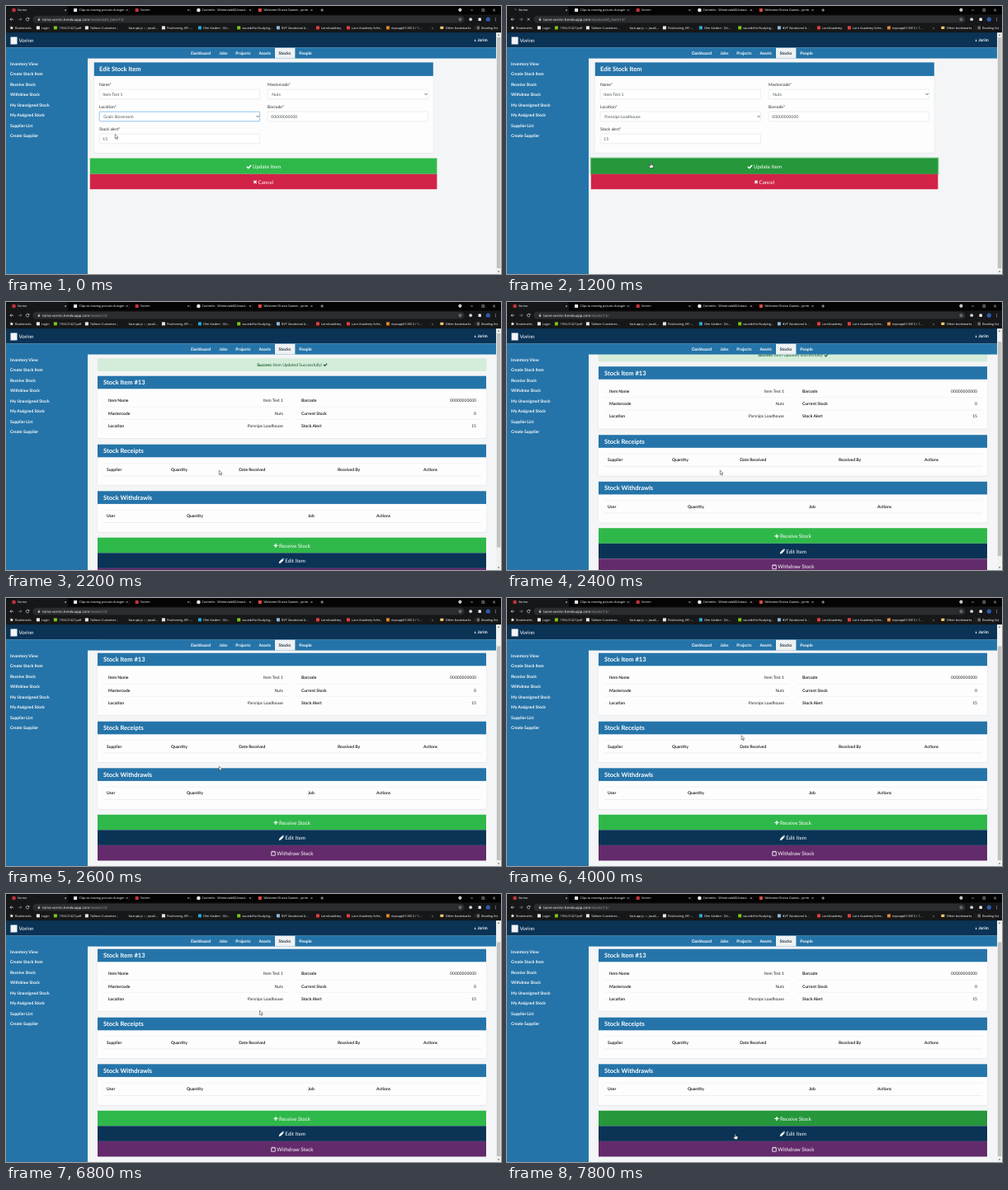
Write an HTML page that moves like this. It is 600x325 px and loops after 8000 ms.

```html
<!DOCTYPE html>
<html lang="en">
<head>
<meta charset="utf-8">
<title>Stock item</title>
<style>
  html, body { margin: 0; width: 100%; height: 100%; overflow: hidden; background: #f4f5f6; }
  svg { display: block; }
  #stage { width: 100vw; height: 100vh; }
  text { font-family: Lato, sans-serif; font-size: 5px; text-rendering: geometricPrecision; white-space: pre; }
  .ui { font-family: "Open Sans", "Noto Sans", sans-serif; font-size: 3.75px; }
</style>
</head>
<body>
<svg id="stage" viewBox="0 0 600 325" preserveAspectRatio="none"></svg>
<script>
const LOOP = 8000, STEP = 200;
const BLUE = '#2574a9', NAVY = '#0a3356', GREEN = '#2fb84a', DARK_GREEN = '#26973b';
const RED = '#d12348', PURPLE = '#642b6c', INK = '#212529', LINE = '#dee2e6';
const STRIP = '#040404', TOOLBAR = '#161718', PILL = '#2b2c2f';
const BRAND = 'Vorinn', HOST = 'tarne-vorinn.herokuapp.com';
const OLD_PLACE = 'Grain Storeroom', NEW_PLACE = 'Parsnips Loadhouse';

const rect = (x, y, w, h, fill, more = '') =>
  `<rect x="${x}" y="${y}" width="${w}" height="${h}" fill="${fill}" ${more}/>`;
const dot = (x, y, r, fill) => `<circle cx="${x}" cy="${y}" r="${r}" fill="${fill}"/>`;
const text = (x, y, str, fill = INK, more = '') =>
  `<text x="${x}" y="${y}" fill="${fill}" ${more}>${str}</text>`;
const bold = (x, y, str, fill = INK, more = '') => text(x, y, str, fill, 'font-weight="700" ' + more);
const ui = (x, y, str, fill = '#fff', more = '') => text(x, y, str, fill, 'class="ui" ' + more);
const stroke = (d, color, w = .6, more = '') =>
  `<path d="${d}" fill="none" stroke="${color}" stroke-width="${w}" ${more}/>`;
const hline = (x1, x2, y, w = .35) => stroke(`M${x1} ${y}H${x2}`, LINE, w);
const group = (id, body, more = '') => `<g id="${id}" ${more}>${body}</g>`;
const END = 'text-anchor="end"';

// Button icons, each drawn around its own centre
const ICONS = {
  check: stroke('M-2.6 .2L-.8 2L2.7 -1.7', '#fff', 1.5),
  cross: stroke('M-1.6 -1.6L1.6 1.6M1.6 -1.6L-1.6 1.6', '#fff', 1.3),
  plus: stroke('M-2.5 0H2.5M0 -2.5V2.5', '#fff', 1.2),
  pencil: '<path d="M-3 3L-2.5 .8L.8 -2.5L2.5 -.8L-.8 2.5ZM1.2 -2.9L2 -3.4L3.3 -2L2.9 -1.2Z" fill="#fff"/>',
  calendar: stroke('M-2.3 -1.8H2.3V2.6H-2.3ZM-1.1 -3V-1.4M1.1 -3V-1.4', '#fff', .8)
};
const icon = (name, x, y) => `<g transform="translate(${x} ${y})">${ICONS[name]}</g>`;

function button(id, x, y, w, h, fill, label, name, iconX, textX) {
  const mid = y + h / 2 + .4;
  return rect(x, y, w, h, fill, `id="${id}"`) + icon(name, iconX, mid) +
    text(textX, mid + 2.2, label, '#fff', 'style="font-size:6.25px"');
}

function card(x, y, w, h, head, title, titleX) {
  return rect(x - .4, y + .5, w + .8, h + .3, '#e3e5e7', 'rx="1.2"') +
    rect(x, y, w, h, '#fdfdfd', 'rx="1"') + rect(x, y, w, head, BLUE) +
    bold(titleX, y + head / 2 + 2.6, title, '#fff', 'style="font-size:7.5px"');
}

function field(x, y, label, value, select, id) {
  return text(x, y - 4.2, label, '#2b2f33') +
    rect(x + .2, y + .2, 194.4, 11.6, '#fff', `rx="1" stroke="#ced4da" stroke-width=".4" id="${id}Box"`) +
    text(x + (select ? 5.3 : 4.3), y + 7.9, value, '#495057', `id="${id}Text"`) +
    (select ? stroke(`M${x + 190.7} ${y + 5.2}l1.4 1.4l1.4 -1.4`, '#222', .8) : '');
}

function formPage() {
  return card(106.8, 68.4, 411, 109.6, 16.5, 'Edit Stock Item', 113) +
    field(113, 101, 'Name*', 'Item Test 1', false, 'name') +
    field(317, 101, 'Mastercode*', 'Nuts', true, 'code') +
    field(113, 128, 'Location*', OLD_PLACE, true, 'place') +
    field(317, 128, 'Barcode*', '00000000000', false, 'bar') +
    field(113, 155, 'Stock alert*', '15', false, 'alert') +
    rect(100.8, 183.6, 422.6, 21.2, '#8fd79d', 'rx="1" id="ring"') +
    button('update', 101.8, 184.6, 420.6, 19.2, GREEN, 'Update Item', 'check', 294.5, 299) +
    button('cancel', 101.8, 203.8, 420.6, 18.4, RED, 'Cancel', 'cross', 302, 305.5);
}

function table(y, columns) {
  return hline(118, 576, y) + hline(118, 576, y + 15.3, .6) +
    columns.map(([x, label]) => bold(x, y + 9.2, label)).join('');
}

function itemPage() {
  const rows = [
    ['Item Name', 'Item Test 1', 'Barcode', '00000000000'],
    ['Mastercode', 'Nuts', 'Current Stock', '0'],
    ['Location', NEW_PLACE, 'Stock Alert', '15']
  ];
  const details = rows.map(([a, b, c, d], i) => {
    const y = 121.2 + 15.3 * i;
    return bold(124, y, a) + text(336, y, b, INK, END) + bold(358, y, c) + text(570, y, d, INK, END) +
      (i < 2 ? hline(118, 342, y + 6) + hline(352, 576, y + 6) : '');
  }).join('');
  return rect(111.2, 68.7, 470.6, 14.8, '#d4edda', 'rx="1" stroke="#c3e6cb" stroke-width=".4"') +
    text(343.7, 77.7, '<tspan font-weight="700">Success:</tspan> Item Updated Successfully!', '#155724', 'text-anchor="middle"') +
    stroke('M385 76L386.4 77.4L389.2 74.6', '#155724', 1.1) +
    card(111, 89.7, 471, 75.5, 15.6, 'Stock Item #13', 118) + details +
    card(111, 172.7, 471, 49.6, 15.6, 'Stock Receipts', 118) +
    table(195.5, [[122, 'Supplier'], [200, 'Quantity'], [282.3, 'Date Received'], [402, 'Received By'], [506, 'Actions']]) +
    card(111, 229.3, 471, 49.6, 15.6, 'Stock Withdrawls', 118) +
    table(252.2, [[122, 'User'], [219, 'Quantity'], [366, 'Job'], [449, 'Actions']]) +
    button('receive', 111, 285.7, 471, 18.6, GREEN, 'Receive Stock', 'plus', 327, 331) +
    button('edit', 111, 304.3, 471, 18.6, NAVY, 'Edit Item', 'pencil', 333.8, 338.2) +
    button('withdraw', 111, 322.9, 471, 18.6, PURPLE, 'Withdraw Stock', 'calendar', 324, 328.3);
}

function siteFrame() {
  const nav = [[224, 'Dashboard'], [258.4, 'Jobs'], [278.3, 'Projects'], [306.4, 'Assets'], [330.6, 'Stocks'], [355.3, 'People']];
  const side = ['Inventory View', 'Create Stock Item', 'Receive Stock', 'Withdraw Stock',
    'My Unassigned Stock', 'My Assigned Stock', 'Supplier List', 'Create Supplier'];
  return rect(0, 32, 594.2, 18.5, NAVY) + rect(0, 50.4, 594.2, 13.2, BLUE) + rect(0, 63, 99, 262, BLUE) +
    rect(5.5, 37.5, 8, 9, '#f2f5f7') +
    text(15.5, 43.9, BRAND, '#fff', 'style="font-size:6.25px"') +
    dot(568.6, 41.2, .6, '#fff') + rect(567.8, 42, 1.6, 1.1, '#fff', 'rx=".5"') +
    bold(571.4, 43.3, 'Jorim', '#fff') +
    rect(326, 50.8, 24.4, 12.8, '#eef1f3') +
    nav.map(([x, s]) => bold(x, 58.9, s, s === 'Stocks' ? '#24313b' : '#fff')).join('') +
    side.map((s, i) => bold(5, 71.9 + 12.45 * i, s, '#fff')).join('');
}

function scrollbar() {
  return rect(594.2, 32, 5.8, 293, '#f1f1f1') +
    rect(594.9, 38, 4.5, 280, '#c1c1c1', 'id="thumb"') +
    '<path d="M595.9 35.8L597.1 34.3L598.3 35.8ZM595.9 321.4L597.1 322.9L598.3 321.4Z" fill="#444"/>';
}

function browser() {
  const tabs = [
    ['', BRAND], ['#dfe8f5', 'Clips to moving picture changer'], ['#c8323c', BRAND],
    ['#f0f0f0', 'Commits · Wintervale82/ireact-'], ['#d94a3d', 'Welcome Orvian Guests - jorim']
  ];
  const marks = [
    [39, '#f0f0f0', 'Login'], [60, '#7ac520', '1706.01427.pdf'], [98, '#e8e8e8', 'Tallmor Customer...'],
    [144.5, '', 'face-api.js — JavaS...'], [191, '#e8e8e8', 'Positioning API -...'],
    [235, '#2aa5dc', 'Olm Varden - Dri...'], [282.3, '#76c61c', 'soundsForStudying...'],
    [330, '#8ebbdc', 'BVT Vocational A...'], [378, '#e2413c', 'LornAcademy'],
    [415, '#e2413c', 'Lorn Academy Sche...'], [463, '#d98a2b', 'mpcapp01:8012 / 1...']
  ];
  const tabRow = tabs.map(([color, label], i) => {
    const x = i * 74.6;
    return (color ? (i === 3 ? dot(x + 9.6, 5, 2.3, color) : rect(x + 7.5, 3, 4, 4, color)) : '') +
      `<svg x="${x + 13.8}" y="0" width="55.5" height="11">${ui(0, 6.4, label)}</svg>` +
      stroke(`M${x + 71.1} 4.1l1.9 1.9m0 -1.9l-1.9 1.9`, '#fff', .45) +
      (i && i < 4 ? stroke(`M${x + 74.6} 3V8`, '#555', .3) : '');
  }).join('');
  const markRow = marks.map(([x, color, label]) =>
    (color ? rect(x - 2.1, 24.4, 4, 4, color) : '') + ui(x + 4, 27.7, label)).join('');
  return rect(0, 0, 600, 11, STRIP) + rect(0, .6, 75, 11, TOOLBAR, 'rx="2"') +
    rect(0, 10.5, 600, 21.7, TOOLBAR) + rect(32.5, 11.8, 523, 8.8, PILL, 'rx="4.4"') +
    tabRow +
    group('favicon', rect(7.5, 3, 4, 4, '#c8323c')) +
    group('spinner', stroke('M9.4 3.6A1.4 1.4 0 0 1 10.8 5', '#a9bccf', .6)) +
    stroke('M381.2 5H385M383.1 3.1V6.9', '#fff', .55) +
    dot(550.4, 4.8, 2, '#eee') + '<path d="M549.4 4.4H551.4L550.4 5.6Z" fill="#111"/>' +
    stroke('M563.1 5H566.1M576.9 3.7H579.6V6.3H576.9ZM590.2 3.6L593 6.4M593 3.6L590.2 6.4', '#fff', .5) +
    stroke('M9 16.2H5M6.7 14.5L5 16.2L6.7 17.9', '#fff', .6) +
    stroke('M15 16.2H19M17.3 14.5L19 16.2L17.3 17.9', '#999', .6) +
    group('reload', stroke('M27.7 15.4A1.8 1.8 0 1 0 27.8 16.8M28 14.2V15.6H26.6', '#fff', .6)) +
    group('stop', stroke('M24.6 14.7L27.6 17.7M27.6 14.7L24.6 17.7', '#fff', .6)) +
    rect(38.8, 15.9, 2.3, 1.8, '#ccc') + stroke('M39.3 16V15.2A.7 .7 0 0 1 40.7 15.2V16', '#ccc', .4) +
    ui(44, 17.7, `${HOST}<tspan id="path" fill="#a4a8ad"></tspan>`, '#fff', 'style="font-size:4.25px"') +
    stroke('M550.5 14.3L551 15.7H552.4L551.3 16.6L551.7 18L550.5 17.2L549.3 18L549.7 16.6L548.6 15.7H550Z', '#ddd', .4) +
    dot(563.2, 16.2, 1.9, '#d0d0d0') + rect(572.5, 14.5, 3.4, 3.4, '#eee', 'rx=".5"') +
    dot(584.3, 16.2, 2.6, '#2c5ba8') +
    dot(593.4, 14.7, .45, '#fff') + dot(593.4, 16.2, .45, '#fff') + dot(593.4, 17.7, .45, '#fff') +
    '<path d="M6.8 24.1L7.4 25.8H9.2L7.8 26.9L8.3 28.6L6.8 27.6L5.3 28.6L5.8 26.9L4.4 25.8H6.2Z" fill="#fff"/>' +
    ui(11, 27.7, 'Bookmarks') + markRow + ui(516, 27.7, '»') +
    rect(526.3, 24.8, 4, 3.2, '#e9c766', 'rx=".4"') + ui(532.8, 27.7, 'Other bookmarks') +
    stroke('M568.2 24V29', '#666', .3) + stroke('M570.6 25H574M570.6 26.4H574M570.6 27.8H574', '#fff', .5) +
    ui(576, 27.7, 'Reading list');
}

const pointer = d =>
  `<path d="${d}" fill="#fff" stroke="#111" stroke-width=".45" stroke-linejoin="round"/>`;
function cursors() {
  return group('arrow', pointer('M0 0V5.3L1.2 4.2L2.1 6.1L3 5.7L2.1 3.9H3.8Z')) +
    group('hand', pointer('M-.5 .5Q0 -.3 .5 .5V2.4L2.4 2.8Q3 3 2.9 3.7L2.4 6H-.6L-2.2 3.8Q-1.8 3 -1 3.5L-.5 3.9Z'),
      'transform="scale(1.1)"') +
    group('beam', stroke('M-1 -2.7H1M0 -2.7V2.7M-1 2.7H1', '#222', .5));
}

const stage = document.getElementById('stage');
stage.innerHTML = rect(0, 0, 600, 325, '#f4f5f6') + group('form', formPage()) + group('item', itemPage()) +
  siteFrame() + scrollbar() + browser() + group('cursor', cursors());

const el = id => document.getElementById(id);
const show = (id, on) => el(id).setAttribute('display', on ? 'inline' : 'none');
const set = (id, name, value) => el(id).setAttribute(name, value);
const clamp = v => Math.max(0, Math.min(1, v));
const ease = v => v * v * (3 - 2 * v);

// Pointer stops: time, x, y
const TRACK = [
  [0, 132.2, 155.5], [400, 132.2, 155.5], [1000, 174.2, 190], [1200, 174.2, 190],
  [1400, 216.5, 215], [2000, 258.3, 204], [3000, 258.3, 204], [5000, 310, 129.3],
  [6600, 310, 129.3], [7800, 276.7, 290.8], [8000, 276.7, 290.8]
];

function pointerAt(t) {
  const i = Math.max(1, TRACK.findIndex(stop => stop[0] > t));
  const [t0, x0, y0] = TRACK[i - 1], [t1, x1, y1] = TRACK[i];
  const k = ease(clamp((t - t0) / (t1 - t0)));
  return [x0 + (x1 - x0) * k, y0 + (y1 - y0) * k];
}

function draw(t) {
  const saved = t >= 1400, loading = t >= 1200 && !saved;
  const scroll = saved ? 23 * clamp((t - 2200) / 400) : 0;
  const [x, y] = pointerAt(t);
  const onUpdate = !saved && y > 185, onReceive = saved && y > 263;
  const pressed = t >= 1000;

  show('form', !saved);
  show('item', saved);
  set('item', 'transform', `translate(0 ${-scroll})`);
  el('path').textContent = saved ? '/stocks/13/' : '/stocks/edit_item/13/';
  show('favicon', !loading);
  show('spinner', loading);
  show('reload', !loading);
  show('stop', loading);
  set('thumb', 'y', 38 + scroll * 20.4 / 23);
  set('thumb', 'height', saved ? 259.6 : 280);

  el('placeText').textContent = t < 400 ? OLD_PLACE : NEW_PLACE;
  set('placeBox', 'stroke', pressed ? '#ced4da' : '#62abea');
  set('placeBox', 'stroke-width', pressed ? .4 : .7);
  show('ring', pressed);
  set('update', 'fill', onUpdate ? DARK_GREEN : GREEN);
  set('receive', 'fill', onReceive ? DARK_GREEN : GREEN);

  const hand = onUpdate || onReceive;
  const beam = !hand && saved && y < 131;
  show('hand', hand);
  show('beam', beam);
  show('arrow', !hand && !beam);
  set('cursor', 'transform', `translate(${x.toFixed(2)} ${y.toFixed(2)})`);
}

const start = performance.now();
function tick() {
  const t = (performance.now() - start) % LOOP;
  draw(Math.floor(t / STEP) * STEP);
  requestAnimationFrame(tick);
}
tick();
</script>
</body>
</html>
```
